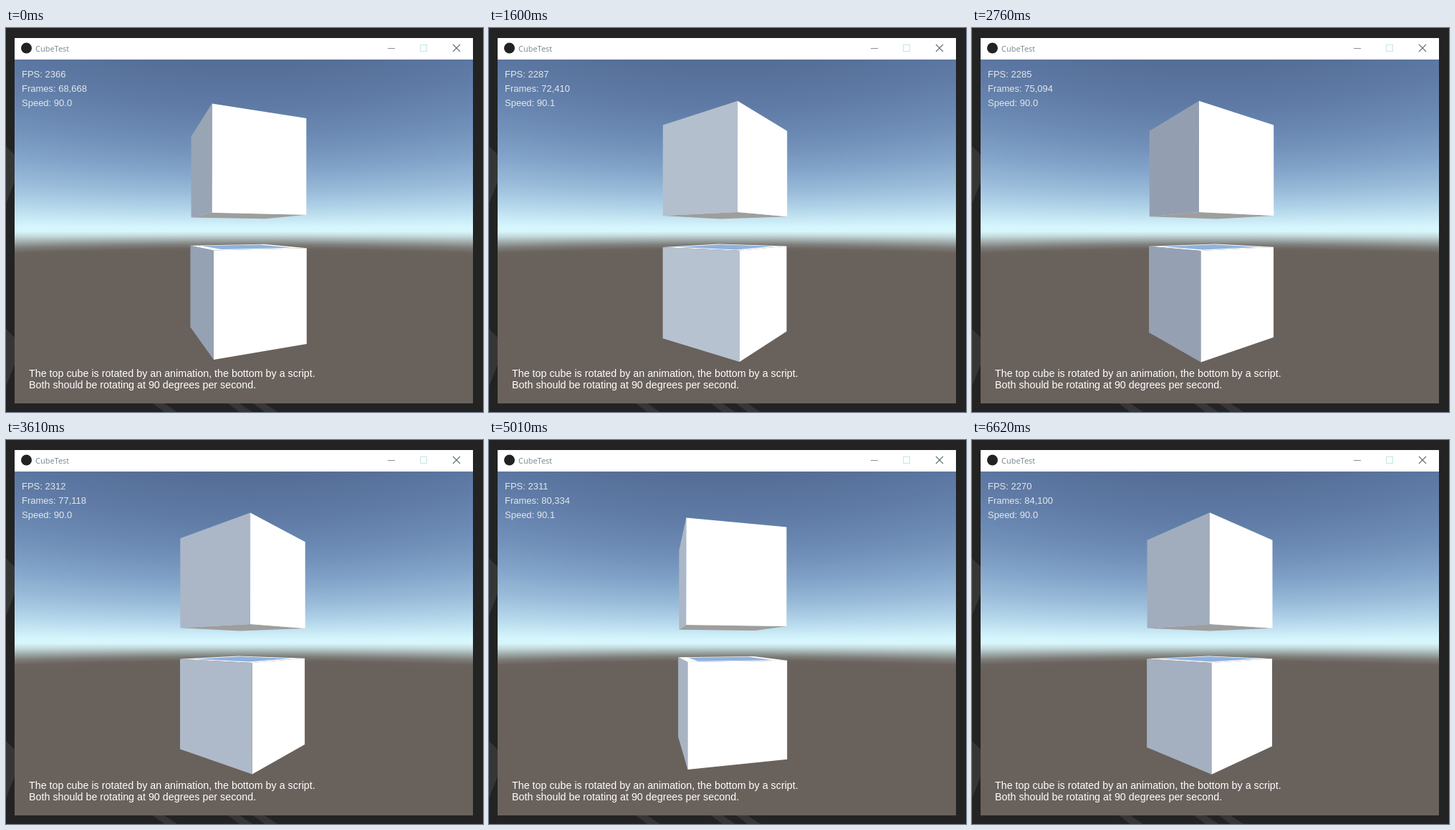
Recreate the animation shown at these times as an HTML page with a canvas. Size 666 by 536 pixels, loop 6.7 s.

```html
<!DOCTYPE html>
<html lang="en">
<head>
<meta charset="utf-8">
<title>CubeTest</title>
<style>
  html, body { margin: 0; width: 100%; height: 100%; overflow: hidden; background: #232323; }
  canvas, svg { position: absolute; left: 0; top: 0; }
  text { white-space: pre; font-family: "Liberation Sans", Arial, sans-serif; }
  .stat { font-size: 13px; fill: #e3e7ec; }
  .note { font-size: 14.3px; fill: #fff; }
  .title { font: 11px "Open Sans", sans-serif; fill: #75898f; }
</style>
</head>
<body>
<canvas id="view" width="666" height="536"></canvas>
<svg width="666" height="536" fill="none">
  <rect x="12" y="14" width="640" height="30" fill="#fff"/>
  <circle cx="28.5" cy="28" r="7.5" fill="#222"/>
  <text class="title" x="41" y="33">CubeTest</text>
  <path d="M533 28.5h10" stroke="#8a8f90"/>
  <rect x="578.5" y="23.5" width="9" height="9" stroke="#c4e6e6"/>
  <path d="M624 23l10 10m0-10l-10 10" stroke="#5d6e74" stroke-width="1.1"/>
  <text class="stat" id="fps" x="22" y="69"></text>
  <text class="stat" id="frames" x="22" y="89"></text>
  <text class="stat" id="speed" x="22" y="109"></text>
  <text class="note" x="32" y="487">The top cube is rotated by an animation, the bottom by a script.</text>
  <text class="note" x="32" y="503">Both should be rotating at 90 degrees per second.</text>
</svg>
<script>
const LOOP = 6700, STEP = 77, LAST_STEP = 86;
const CX = 332, CY = 284, FOCAL = 415.7, DIST = 3.36;
const NEAR_Y = 0.172, FAR_Y = 1.166, RAD = Math.PI / 180;
const ctx = document.getElementById('view').getContext('2d');

const rgb = channels => `rgb(${channels.map(v => Math.min(255, Math.round(v)))})`;

function poly(c, points, fill) {
  c.beginPath();
  points.forEach(([x, y]) => c.lineTo(x, y));
  c.closePath();
  c.fillStyle = fill;
  c.fill();
}

// Sky brightens exponentially towards the horizon, then fades into the ground.
function skyColor(y) {
  const up = Math.min(y, -3);
  const sky = [76 + 148 * Math.exp(up / 85), 95 + 160 * Math.exp(up / 100), 118 + 140 * Math.exp(up / 160)];
  const ground = [105, 97, 92];
  const t = Math.max(0, Math.min(1, (y + 3) / 29));
  const mix = t * t * (3 - 2 * t);
  return rgb(sky.map((v, i) => v + (ground[i] - v) * mix));
}

function makeBackdrop() {
  const canvas = document.createElement('canvas');
  canvas.width = 666;
  canvas.height = 536;
  const c = canvas.getContext('2d');
  c.fillStyle = '#232323';
  c.fillRect(0, 0, 666, 536);
  for (const y of [165, 420]) poly(c, [[0, y], [12, y + 12], [12, y + 50], [0, y + 80]], '#363636');
  for (const x of [205, 310, 345]) poly(c, [[x, 524], [x + 16, 524], [x + 34, 536], [x + 16, 536]], '#363636');

  // Elevation bends the bands at the sides, so each column is stretched.
  for (let x = 12; x < 652; x++) {
    const reach = 240 * Math.hypot(FOCAL, x + 0.5 - CX) / FOCAL;
    const g = c.createLinearGradient(0, CY - reach, 0, CY + reach);
    for (let y = -240; y <= 240; y += 6) g.addColorStop((y + 240) / 480, skyColor(y));
    c.fillStyle = g;
    c.fillRect(x, 44, 1, 480);
  }
  return canvas;
}
const backdrop = makeBackdrop();

// Corner of the cube at an azimuth measured from the viewer, at height y.
function project(azimuth, y, radius = Math.SQRT1_2) {
  const s = FOCAL / (DIST - radius * Math.cos(azimuth * RAD));
  return [CX + radius * Math.sin(azimuth * RAD) * s, CY - y * s];
}

// How squarely a side faces the viewer: 1 head-on, below 0 hidden.
const facing = normal => (DIST * Math.cos(normal * RAD) - 0.5) / (DIST - 0.5);

// Sunlight from the right plus a sky reflection at grazing angles.
function shade(normal) {
  const lit = Math.max(0, Math.cos((normal - 30) * RAD));
  const add = 110 * lit + 60 * lit * lit + 60 * (1 - facing(normal)) ** 3;
  return rgb([126 + add, 139 + add * 0.98, 158 + add * 0.9]);
}

function drawCube(angle, side) {
  const corners = [0, 90, 180, 270].map(a => a + angle);
  const square = radius => corners.map(a => project(a, NEAR_Y * side, radius));
  poly(ctx, square(), side > 0 ? '#9f9e9d' : '#fff');
  if (side < 0) poly(ctx, square(0.55), '#8fb2de');
  for (const a of corners) {
    const normal = a + 45;
    if (facing(normal) <= 0) continue;
    const wrapped = normal - 360 * Math.round(normal / 360);
    poly(ctx, [
      project(a, NEAR_Y * side), project(a + 90, NEAR_Y * side),
      project(a + 90, FAR_Y * side), project(a, FAR_Y * side)
    ], shade(wrapped));
  }
}

// Frame counter: nearly steady, pinned at a few [step, count] readings.
const readings = [[0, 68668], [13, 71003], [21, 72410], [36, 75094], [47, 77118], [65, 80334], [86, 84100]];
function countAt(step) {
  const i = Math.max(1, readings.findIndex(([s]) => s >= step));
  const [s0, n0] = readings[i - 1], [s1, n1] = readings[i];
  return Math.round(n0 + (n1 - n0) * (step - s0) / (s1 - s0));
}

// FPS as measured in each second.
const rates = [2366, 2330, 2287, 2285, 2312, 2311, 2286, 2270];
const label = (id, value) => { document.getElementById(id).textContent = value; };

function draw(now) {
  const step = Math.min(LAST_STEP, Math.floor((now % LOOP + 20) / STEP));
  const second = Math.floor((step + 10) / 13);
  const angle = -24.2 - 7.045 * step;
  ctx.drawImage(backdrop, 0, 0);
  drawCube(angle, 1);
  drawCube(angle + 1.4, -1);
  label('fps', 'FPS: ' + rates[second]);
  label('frames', 'Frames: ' + countAt(step).toLocaleString('en-US'));
  label('speed', 'Speed: ' + (second % 4 === 1 || second % 4 === 2 ? '90.1' : '90.0'));
}

let began;
function tick(now) {
  began ??= now;
  draw(now - began);
  requestAnimationFrame(tick);
}
draw(0);
requestAnimationFrame(tick);
</script>
</body>
</html>
```
